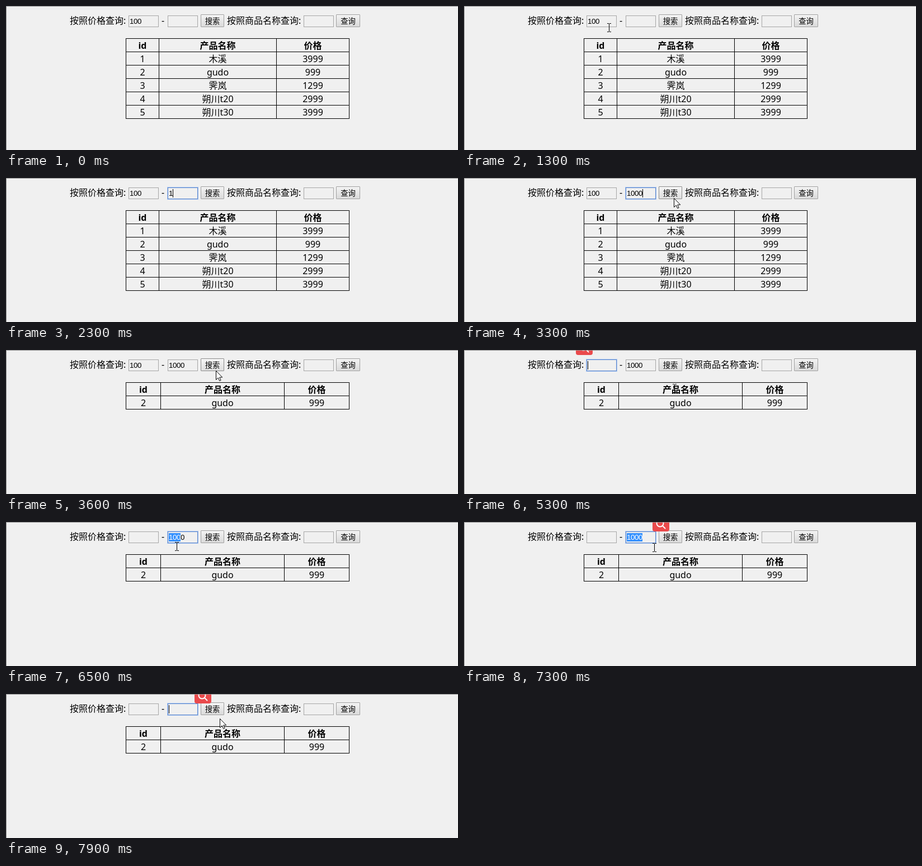
An HTML page for the animation above (8 s loop, 808x259 px).

```html
<!DOCTYPE html>
<html lang="zh-CN">
<head>
<meta charset="utf-8">
<title>产品查询</title>
<style>
  html, body { margin: 0; width: 100%; height: 100%; overflow: hidden; }
  body {
    position: relative; box-sizing: border-box; background: #f0f0f0; color: #000;
    border: solid #8c8c8c; border-width: 1px 0 0 1px;
    font: 16px/24px "Noto Sans", "Noto Sans CJK SC", "Noto Sans CJK", sans-serif;
  }
  #stage { position: absolute; left: -1px; top: -1px; width: 808px; height: 259px; overflow: hidden; }
  #stage > * { position: absolute; box-sizing: border-box; white-space: nowrap; }
  .label { top: 14px; }
  .field {
    top: 17px; width: 54px; height: 21px; padding-left: 1px;
    border: 1px solid #a6a6a6;
    font: 13.333px/19px "Liberation Sans", Arial, sans-serif; letter-spacing: -.4px;
  }
  .field.focus { border-color: #5b86cc; box-shadow: 0 0 0 1px #a9c5f0; }
  .field mark { background: #3390ff; color: #fff; }
  .field i { display: inline-block; width: 1px; height: 15px; margin-right: -1px; vertical-align: -3px; background: #000; }
  .button {
    top: 15px; width: 43px; height: 23px; text-align: center;
    border: 1px solid #a0a0a0; border-radius: 1px;
    background: linear-gradient(#f3f3f3, #dadada);
    font-size: 13.333px; line-height: 22px;
  }
  .button.hover { border-color: #8c8c8c; background: linear-gradient(#f5f5f5, #dedede); }
  .button.down { background: linear-gradient(#d6d6d6, #ececec); }
  .grid {
    left: 214px; top: 58px; width: 400px; display: grid; grid-auto-rows: 24px;
    border: solid #000; border-width: 1px 0 0 1px;
  }
  .grid > * {
    box-sizing: border-box; text-align: center; line-height: 24px;
    border: solid #000; border-width: 0 1px 1px 0;
  }
  #full { grid-template-columns: 59px 210px 130px; }
  #found { grid-template-columns: 62px 221px 116px; }
  svg { left: 0; top: 0; overflow: visible; }
</style>
</head>
<body>
<div id="stage">
  <span class="label" style="left:114px">按照价格查询:</span>
  <div class="field" id="low" style="left:219px"></div>
  <span class="label" style="left:278px">-</span>
  <div class="field" id="high" style="left:289px"></div>
  <div class="button" id="search" style="left:348px;width:42px">搜索</div>
  <span class="label" style="left:395px">按照商品名称查询:</span>
  <div class="field" style="left:532px"></div>
  <div class="button" style="left:590px">查询</div>

  <div class="grid" id="full"></div>
  <div class="grid" id="found"></div>

  <svg id="badge" width="30" height="30">
    <rect width="30" height="30" rx="4" fill="#ea4a4c"/>
    <g fill="none" stroke="#fff" stroke-width="2" stroke-linecap="round">
      <circle cx="13.5" cy="15.5" r="6"/><path d="M18 20l4.5 4.5"/>
    </g>
  </svg>
  <svg id="beam" width="7" height="16" shape-rendering="crispEdges">
    <path d="M0 .5h3M4 .5h3M3.5 1v14M0 15.5h3M4 15.5h3" stroke="#000" fill="none"/>
  </svg>
  <svg id="arrow" width="12" height="19">
    <path d="M.5 .5v16l3.7-3.5 2.5 5.5 2.4-1-2.4-5.4h5z" fill="#fff" stroke="#000"/>
  </svg>
</div>
<script>
const LOOP = 8000, TICK = 100;
const $ = id => document.getElementById(id);

const products = [
  [1, '木溪', 3999], [2, 'gudo', 999], [3, '霁岚', 1299],
  [4, '朔川t20', 2999], [5, '朔川t30', 3999]
];

function fillGrid(id, rows) {
  const cell = tag => text => `<${tag}>${text}</${tag}>`;
  $(id).innerHTML = ['id', '产品名称', '价格'].map(cell('b')).join('') +
    rows.flat().map(cell('span')).join('');
}
fillGrid('full', products);
fillGrid('found', products.filter(p => p[2] <= 1000));

// Each step changes part of the page state from its time on.
const steps = [
  [0, { low: '100', high: '', focus: '', sel: null, badge: null, button: '', found: false }],
  [2000, { focus: 'high' }],
  [2300, { high: '1' }],
  [2500, { high: '10' }],
  [2700, { high: '100' }],
  [2900, { high: '1000' }],
  [3200, { button: 'hover' }],
  [3400, { button: 'down', focus: '' }],
  [3500, { button: 'hover', found: true }],
  [3700, { button: '' }],
  [4100, { focus: 'low' }],
  [4300, { sel: [2, 3] }],
  [4400, { sel: [0, 3] }],
  [4700, { badge: [200, -21] }],
  [4900, { low: '', sel: null }],
  [6200, { focus: 'high', badge: null }],
  [6400, { sel: [0, 3] }],
  [6700, { badge: [271, -13] }],
  [7000, { sel: null }],
  [7100, { sel: [0, 2] }],
  [7200, { sel: [0, 4] }],
  [7300, { badge: [337, -13] }],
  [7500, { high: '', sel: null }]
];

// Pointer path: time, x, y, shape held until the next point.
const path = [
  [0, 135, 13, ''], [200, 135, 13, 'beam'], [500, 294, 40, 'beam'], [900, 262, 38, 'beam'],
  [1300, 259, 38, 'beam'], [1500, 275, 40, 'arrow'], [1800, 331, 40, 'arrow'],
  [1900, 315, 36, 'beam'], [2300, 310, 32, ''], [3000, 320, 42, 'arrow'],
  [3300, 375, 36, 'arrow'], [3600, 375, 37, 'arrow'], [3800, 548, 46, 'arrow'],
  [4000, 250, 32, 'beam'], [4300, 217, 37, 'beam'], [4500, 203, 37, 'beam'],
  [4900, 203, 37, 'arrow'], [5200, 300, 58, 'arrow'], [5300, 376, 68, 'beam'],
  [5400, 553, 72, 'beam'], [5600, 553, 72, 'arrow'], [6100, 320, 34, 'beam'],
  [6300, 313, 32, 'beam'], [6500, 305, 43, 'beam'], [6600, 274, 46, 'beam'],
  [6900, 274, 46, 'beam'], [7000, 290, 42, 'beam'], [7200, 332, 46, 'beam'],
  [7300, 340, 45, 'beam'], [7400, 440, 54, 'arrow'], [7500, 548, 57, 'arrow'],
  [7900, 382, 44, 'arrow']
];

function stateAt(t) {
  const past = steps.filter(s => s[0] <= t);
  const state = Object.assign({}, ...past.map(s => s[1]));
  const edit = past.filter(s => 'low' in s[1] || 'high' in s[1] || 'focus' in s[1]).pop();
  state.caret = (t - edit[0]) % 1000 < 500;
  return state;
}

function pointerAt(t) {
  const next = path.findIndex(p => p[0] > t);
  if (next < 0) return path[path.length - 1].slice(1);
  const a = path[next - 1], b = path[next];
  const k = (t - a[0]) / (b[0] - a[0]);
  return [a[1] + (b[1] - a[1]) * k, a[2] + (b[2] - a[2]) * k, a[3]];
}

function place(el, shown, x, y) {
  el.style.display = shown ? '' : 'none';
  el.style.transform = `translate(${Math.round(x)}px, ${Math.round(y)}px)`;
}

function drawField(id, s) {
  const text = s[id], active = s.focus === id;
  $(id).classList.toggle('focus', active);
  if (active && s.sel) {
    const [from, to] = s.sel;
    $(id).innerHTML = `${text.slice(0, from)}<mark>${text.slice(from, to)}</mark>${text.slice(to)}`;
  } else {
    $(id).innerHTML = text + (active && s.caret ? '<i></i>' : '');
  }
}

function draw(t) {
  const s = stateAt(t);
  drawField('low', s);
  drawField('high', s);
  $('search').className = 'button ' + s.button;
  $('full').style.display = s.found ? 'none' : '';
  $('found').style.display = s.found ? '' : 'none';
  place($('badge'), s.badge, ...(s.badge || [0, 0]));
  const [x, y, shape] = pointerAt(t);
  place($('beam'), shape === 'beam', x - 3, y - 7);
  place($('arrow'), shape === 'arrow', x, y);
}

const start = performance.now();
let shown = -1;
function frame() {
  const t = Math.floor(Math.max(0, performance.now() - start) % LOOP / TICK) * TICK;
  if (t !== shown) draw(shown = t);
  requestAnimationFrame(frame);
}
frame();
</script>
</body>
</html>
```
